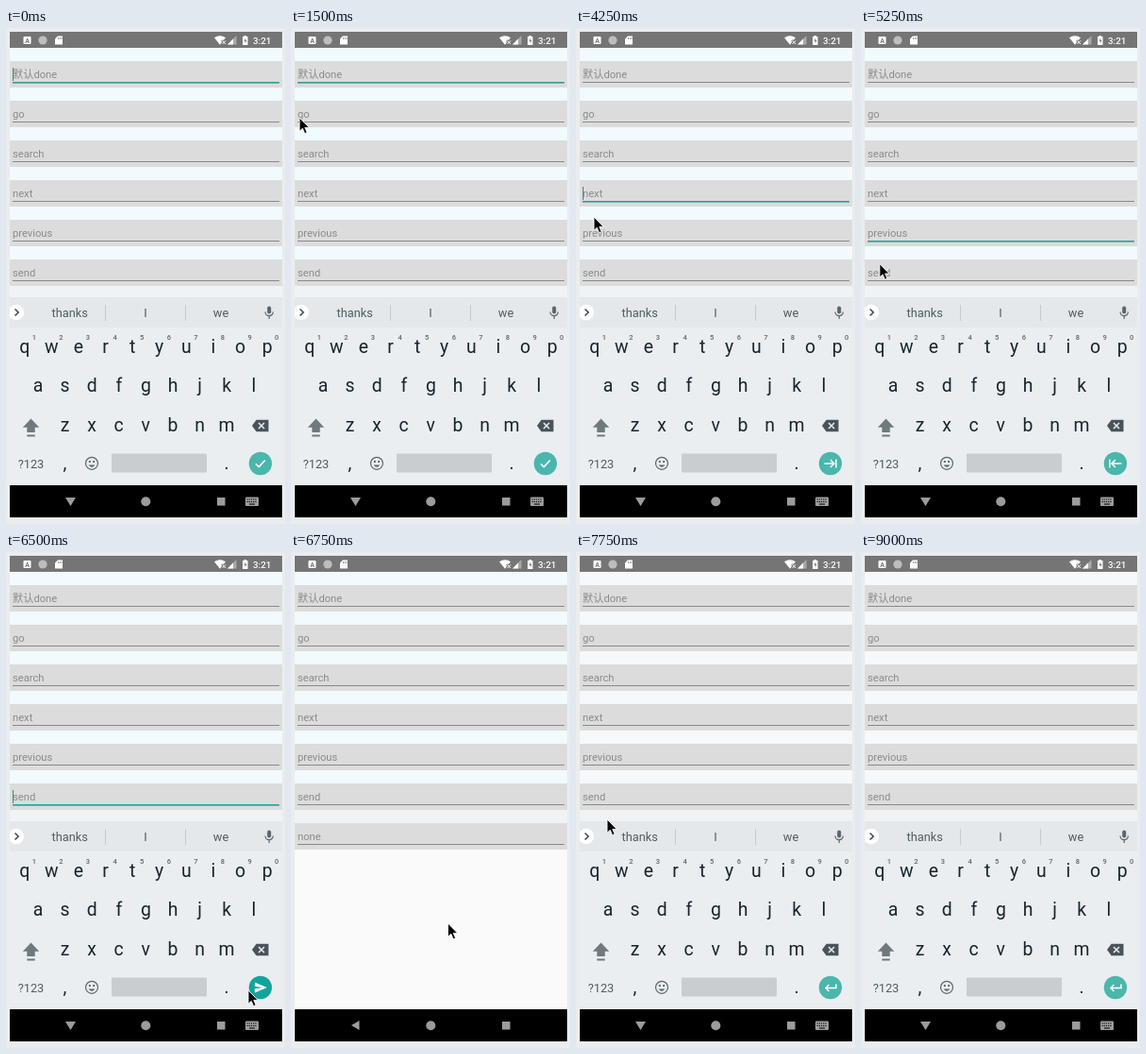
These frames come from a looping animation (296x525 px, 9750 ms). An HTML page:

```html
<!DOCTYPE html>
<html lang="en">
<head>
<meta charset="utf-8">
<title>Keyboard actions</title>
<style>
  html, body { margin: 0; width: 100%; height: 100%; overflow: hidden; background: #eaecee; }
  svg { display: block; width: 296px; height: 525px; font-family: Roboto, "Noto Sans CJK SC", "Noto Sans CJK", sans-serif; }
  .mid { text-anchor: middle; }
  .hint { font-size: 11.2px; fill: #8b8b8b; }
  .key { font-size: 19.4px; fill: #17252c; }
  .num { font-size: 7.5px; font-weight: 500; fill: #5c666b; }
  .word { font-size: 12.8px; fill: #4f5b61; }
  .line { fill: none; }
</style>
</head>
<body>
<svg viewBox="0 0 296 525" xmlns="http://www.w3.org/2000/svg">
  <defs><clipPath id="screen"><rect x="4" y="4" width="289" height="514"/></clipPath></defs>
  <g clip-path="url(#screen)">
    <rect x="4" y="4" width="289" height="514" fill="#fafafa"/>
    <rect id="gaps" x="4" y="21" width="289" height="252"/>
    <rect x="4" y="273" width="289" height="15" fill="#f0f3f5"/>
    <g id="fields"></g>
    <rect id="caret" x="7" width="1" height="14" fill="#3f8a80"/>

    <rect x="4" y="4" width="289" height="17" fill="#757575"/>
    <g fill="#fff">
      <rect x="18.5" y="9" width="8" height="8" rx="1"/>
      <text class="mid" x="22.5" y="15.6" font-size="7" font-weight="700" fill="#757575">A</text>
      <circle cx="39" cy="13" r="4.6" fill="#bdbdbd"/>
      <path d="M55 8.5h5v9h-8v-6z"/>
      <path d="M55.5 10v2M57.2 10v2M58.9 10v2" stroke="#757575" stroke-width=".7"/>
      <path d="M221 10.3Q227 6 233 10.3L227 17.8z"/>
      <path d="M229 13l4 4m0-4l-4 4" stroke="#757575" stroke-width="2.4"/>
      <path d="M229.6 13.4l3.4 3.6m0-3.6l-3.4 3.6" stroke="#fff"/>
      <path d="M244.5 8v9.5H235z" fill="#aaa"/>
      <path d="M241 11.5v6h-6z"/>
      <path d="M251 9h1.6V8h2.3v1h1.6v9H251z"/>
      <path d="M254.2 10.5l-1.6 3.2h1.2v2.6l1.6-3.3h-1.2z" fill="#757575"/>
      <text x="262" y="16.5" font-size="9.8" font-weight="500">3:21</text>
    </g>

    <g id="board">
      <rect x="4" y="285" width="289" height="200" fill="#eaeef1"/>
      <rect x="4" y="285" width="289" height="32" fill="#e4e8eb"/>
      <circle cx="10.8" cy="301" r="8.3" fill="#fff"/>
      <path class="line" d="M9.5 297.5l3.6 3.5-3.6 3.5" stroke="#37474f" stroke-width="1.5"/>
      <path d="M105.5 293v17M190.5 293v17" stroke="#c5cacd"/>
      <rect x="277.2" y="294.5" width="4" height="8" rx="2" fill="#5a666c"/>
      <path class="line" d="M275 300.5a4.2 4.2 0 0 0 8.4 0M279.2 304.7v3.2" stroke="#5a666c" stroke-width="1.2"/>
      <g id="keys"></g>
      <path d="M26.5 413.5l8.7 9.2h-4.5v5.3h-8.4v-5.3h-4.5zM22.3 430.5h8.4v2h-8.4z" fill="#6f797e"/>
      <path d="M261 421l4.6-6.2h12.9v12.4h-12.9z" fill="#48545a"/>
      <path d="M268 418l6 6m0-6l-6 6" stroke="#eaeef1" stroke-width="1.5"/>
      <g class="line" stroke="#5a666c" stroke-width="1.2">
        <circle cx="91" cy="460.8" r="6.5"/>
        <path d="M87.6 462.5q3.4 4.4 6.8 0z" fill="#5a666c" stroke="none"/>
        <path d="M87.9 459h1.9M92.2 459h1.9" stroke-width="1.8"/>
      </g>
      <rect x="112" y="450.5" width="101" height="20" rx="1" fill="#c9cdd0"/>
      <g transform="translate(269.9 461)">
        <circle id="button" r="12.2"/>
        <path id="action" class="line" stroke="#fff" stroke-width="1.5"/>
      </g>
    </g>

    <rect x="4" y="484" width="289" height="34" fill="#000"/>
    <g fill="#9c9c9c">
      <path id="back"/>
      <circle cx="148.3" cy="501.3" r="5"/>
      <rect x="224" y="497" width="8.5" height="8.5"/>
      <g id="switcher">
        <rect x="254" y="496.5" width="14" height="9.5" rx="1"/>
        <path d="M255.5 499h11M255.5 501.5h11" stroke="#000" stroke-dasharray="1.2 1"/>
        <path d="M258 504h6" stroke="#000"/>
      </g>
    </g>
  </g>
  <path id="mouse" d="M0 0V14.3L3.3 11.3 5.6 16.7 8.1 15.6 5.8 10.4H10.3Z" stroke="#fff" stroke-width=".9"/>
</svg>
<script>
const LOOP = 9750, STEP = 250;
const SEND = 5, NONE = 6;
const $ = id => document.getElementById(id);
const set = (el, attrs) => { for (const k in attrs) el.setAttribute(k, attrs[k]); return el; };
const show = (id, on) => set($(id), { visibility: on ? 'visible' : 'hidden' });
const add = (parent, tag, attrs, text = '') => {
  const el = set(document.createElementNS('http://www.w3.org/2000/svg', tag), attrs);
  el.textContent = text;
  return parent.appendChild(el);
};

const hints = ['默认done', 'go', 'search', 'next', 'previous', 'send', 'none'];
const rowY = i => Math.floor(35 + i * 42.15);
const lines = hints.map((hint, i) => {
  const y = rowY(i), fields = $('fields');
  add(fields, 'rect', { x: 4, y, width: 289, height: 28, fill: '#dcdcdc' });
  add(fields, 'text', { x: 7, y: y + 17.5, class: 'hint' }, hint);
  return add(fields, 'rect', { x: 7, y: y + 22, width: 283 });
});

const label = (x, y, text, cls) => add($('keys'), 'text', { x, y, class: 'mid ' + cls }, text);
const keyRow = (letters, x, y, cls = 'key') =>
  [...letters].forEach((c, i) => label(x + i * 28.6, y, c, cls));
keyRow('qwertyuiop', 19.7, 344);
keyRow('asdfghjkl', 34, 385);
keyRow('zxcvbnm', 62.5, 426.5);
keyRow('1234567890', 29.8, 329.5, 'num');
label(67.7, 306, 'thanks', 'word');
label(148, 306, 'I', 'word');
label(228, 306, 'we', 'word');
label(26.5, 465.5, '?123', 'word');
label(62.5, 467, ',', 'key');
label(234, 467, '.', 'key');

const icons = [
  'M-5 .2L-1.6 3.6 5-3.4',
  'M-6 0H5M1-4.5L5.5 0 1 4.5',
  'M2.5-1.5a3.7 3.7 0 1 1-7.4 0a3.7 3.7 0 1 1 7.4 0M1.5 1.5l4 4',
  'M-6.5 0H3.5M0-4L4 0 0 4M6-4.5v9',
  'M6.5 0H-3.5M0-4L-4 0 0 4M-6-4.5v9',
  'M-6-5.5L7 0-6 5.5V1.3L2.5 0-6-1.3Z',
  'M6-3.5v4H-5M-1.5-3L-5 .5-1.5 4'
];

// when each field is tapped
const taps = [0, 2000, 3250, 4000, 4750, 5500, 7500];
const sent = 6750, reopened = 7750;

// pointer key points: time, x, y
const path = [
  [250, 41, 36], [1000, 4, 80], [1500, 9, 95], [2250, 9, 95], [3000, 11, 134],
  [4250, 19, 200], [5500, 20, 262], [6500, 257, 464], [7000, 76, 322],
  [7500, 24, 302], [8000, 42, 264], [8750, 144, 78]
];

function pointer(t) {
  const next = path.findIndex(p => p[0] >= t);
  if (next < 0 || t < path[0][0]) return null;
  const b = path[next], a = path[Math.max(next - 1, 0)];
  const k = (t - a[0]) / (b[0] - a[0] || 1);
  return [1, 2].map(i => a[i] + (b[i] - a[i]) * k);
}

function draw(t) {
  const field = taps.findLastIndex(tap => tap <= t);
  const board = t < sent || t >= reopened;
  const focused = board || field === NONE;

  lines.forEach((el, i) => set(el, focused && i === field
    ? { fill: '#2aa093', height: 1.6 }
    : { fill: '#898989', height: 1 }));
  set($('caret'), { y: rowY(field) + 7 });
  show('caret', focused && (t - taps[field]) % 1000 < 500);

  set($('gaps'), { fill: t < reopened ? '#f1fafe' : '#f5f9fb' });
  show('board', board);
  show('switcher', board);
  set($('back'), { d: board ? 'M63 497h11l-5.5 9z' : 'M72.5 496v10l-8.5-5z' });
  set($('button'), { fill: field === SEND ? '#12a49b' : '#4bb6ac' });
  set($('action'), { d: icons[field], style: field === SEND ? 'fill:#fff;stroke:none' : '' });

  const tip = pointer(t);
  show('mouse', tip);
  if (tip) set($('mouse'), { transform: `translate(${tip})` });
}

const began = performance.now();
let last = -1;
function tick() {
  const t = Math.floor(((performance.now() - began) % LOOP) / STEP) * STEP;
  if (t !== last) draw(last = t);
  requestAnimationFrame(tick);
}
tick();
</script>
</body>
</html>
```
